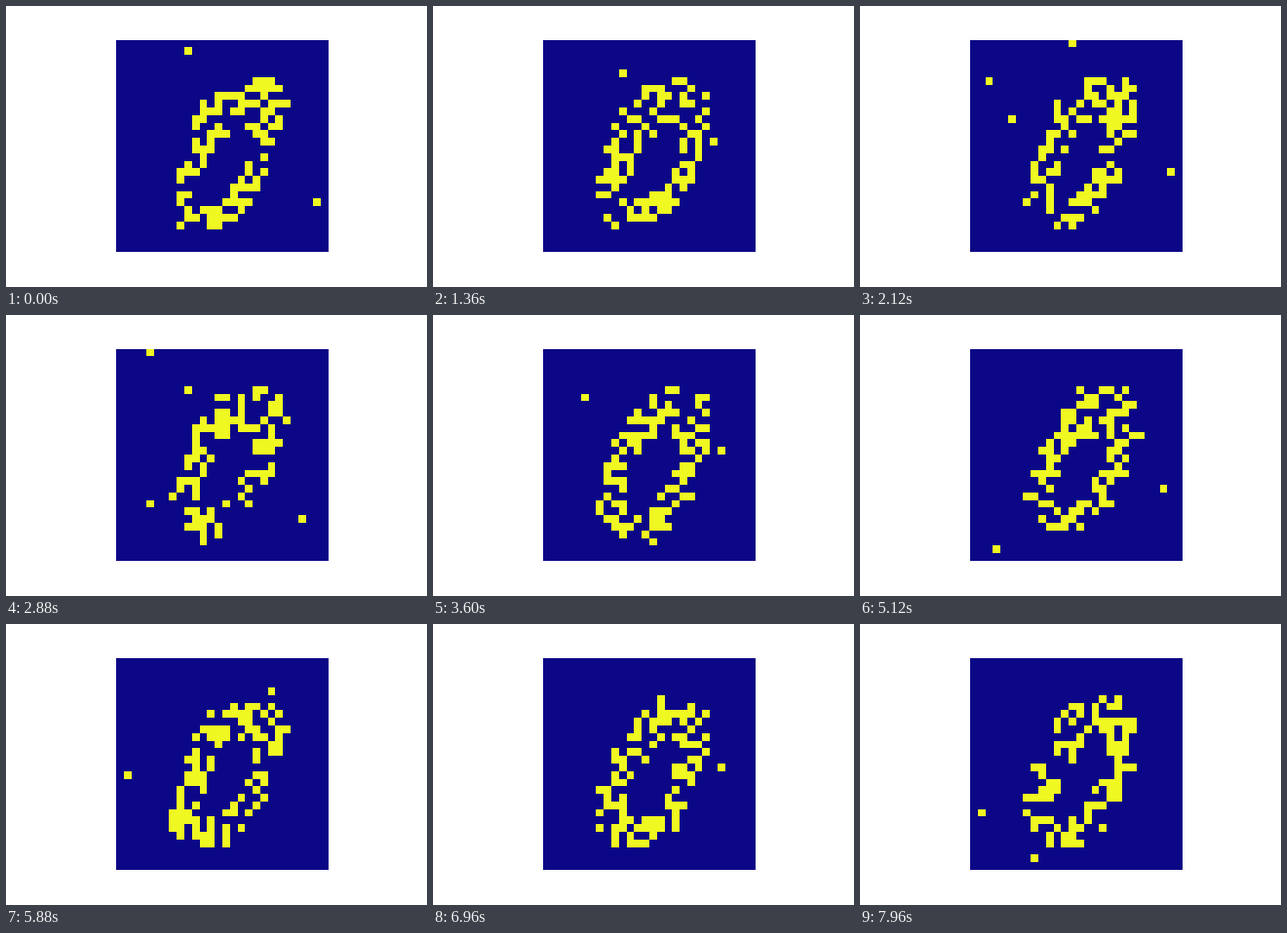
A matplotlib script for the animation above (8000 ms loop, 432 by 288 pixels).

```python
import numpy as np
import matplotlib.pyplot as plt
from matplotlib.animation import FuncAnimation

N, STEPS, INTERVAL = 28, 200, 40
RATE, NOISE = 0.52, 0.005

rows, cols = np.mgrid[:N, :N]


def oval(row, col, height, width, slant, power, sharp):
    """Soft-edged slanted superellipse: 1 inside, 0 outside."""
    v = (rows - row) / height
    u = (cols - col + slant * (rows - row)) / width
    level = (np.abs(u) ** power + np.abs(v) ** power) ** (1 / power)
    return np.clip((1 - level) * sharp + 0.5, 0, 1)


# A slanted handwritten zero
outer = oval(14.5, 14.3, 9.8, 6.3, slant=0.33, power=2.5, sharp=6)
hole = oval(15.8, 14.0, 5.4, 2.5, slant=0.47, power=2, sharp=3)
shape = outer * (1 - hole)

# Rate-coded spike trains: each cell fires independently at every step
rng = np.random.default_rng(7)
chance = np.maximum(RATE * shape, NOISE)
spikes = (rng.random((STEPS, N, N)) < chance).astype(float)

fig, ax = plt.subplots(figsize=(6, 4), dpi=72, facecolor="white")
fig.subplots_adjust(left=0.125, right=0.9, bottom=0.125, top=0.88)
ax.axis("off")
image = ax.imshow(spikes[0], cmap="plasma", vmin=0, vmax=1,
                  interpolation="nearest")


def update(step):
    image.set_data(spikes[step])
    return (image,)


anim = FuncAnimation(fig, update, frames=STEPS, interval=INTERVAL,
                     repeat=True, repeat_delay=0)
plt.show()
```
